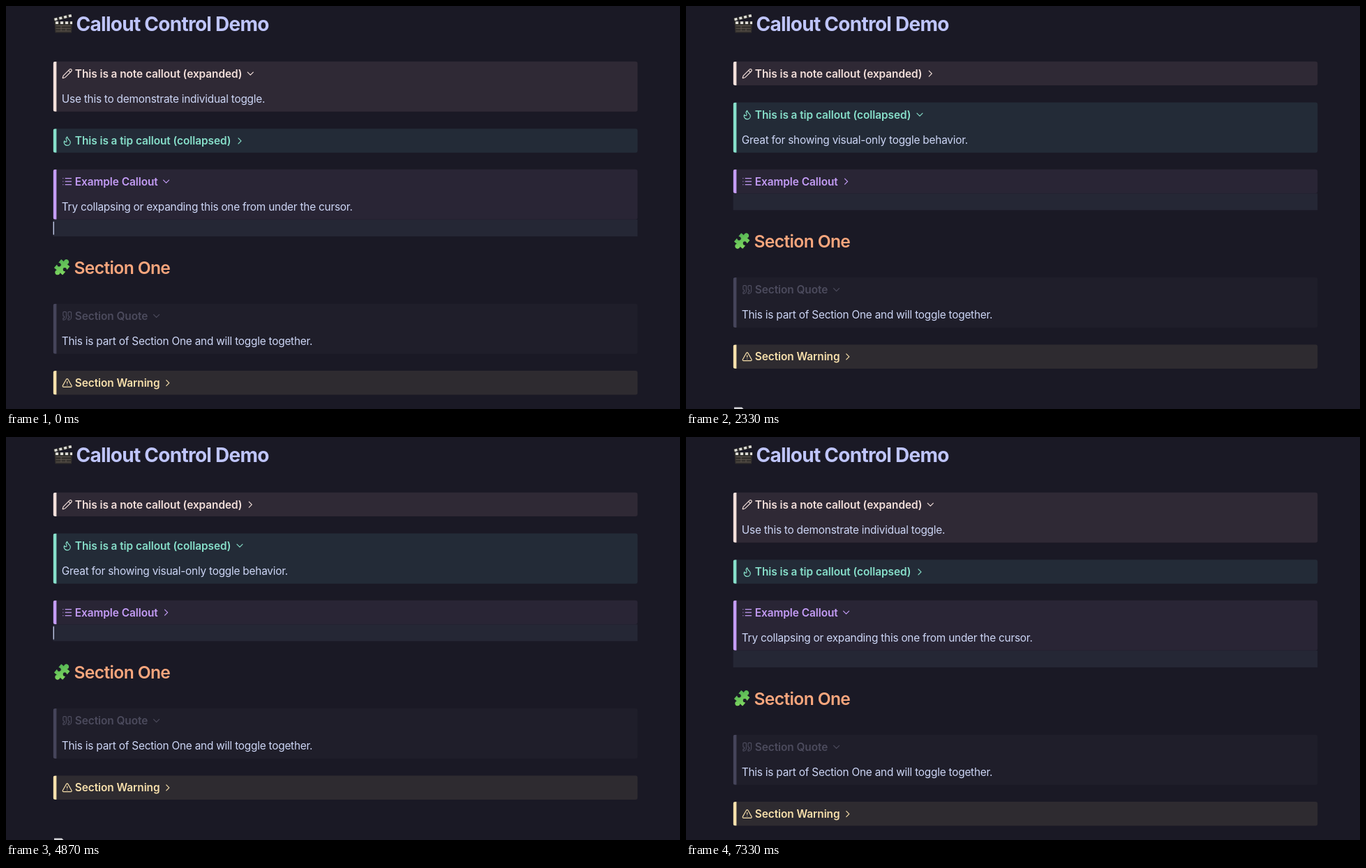
Recreate the animation shown at these times as an HTML page. Size 966 px wide and 579 px high, loop 7.4 s.

```html
<!DOCTYPE html>
<html lang="en">
<head>
<meta charset="utf-8">
<title>Callout Control Demo</title>
<style>
  /* --b: 0 = first layout, 1 = toggled layout; --turn: chevron progress between them */
  @property --b { syntax: "<number>"; inherits: true; initial-value: 0; }
  @property --turn { syntax: "<number>"; inherits: true; initial-value: 0; }

  html, body { margin: 0; width: 100%; height: 100%; overflow: hidden; background: #1a1925; }
  svg {
    display: block; width: 966px; height: 579px;
    font-family: Inter, "Liberation Sans", sans-serif;
    font-optical-sizing: none;
    --step: 37.7px;
    animation: layout 7.4s step-end infinite, turn 7.4s step-end infinite;
  }

  .h1 { font-size: 28px; font-weight: 700; letter-spacing: -.74px; fill: #bfc5fb; }
  .h2 { font-size: 24.6px; font-weight: 600; letter-spacing: -.62px; fill: #f8a67d; }
  .title { font-size: 15.4px; font-weight: 600; letter-spacing: -.06px; fill: var(--ink); }
  .text { font-size: 15.4px; letter-spacing: -.235px; fill: #cdd6f6; }
  .icon, .fold { fill: none; stroke: var(--ink); stroke-linecap: round; stroke-linejoin: round; }
  .icon { stroke-width: 1.8; }
  .fold { stroke-width: 1.2; }

  .box { width: 837.6px; height: var(--h); rx: 3px; fill: var(--bg); }
  .bar { width: 5px; height: var(--h); fill: var(--edge, var(--ink)); clip-path: inset(0 round 3px 0 0 3px); }

  .note { --ink: #f3dfda; --bg: #2f2935; }
  .tip { --ink: #87dfca; --bg: #232b37; }
  .example { --ink: #c49cf6; --bg: #292535; }
  .quote { --ink: #4c4b5d; --bg: #1f1e2a; --edge: #45445a; }
  .warning { --ink: #f8e0ac; --bg: #2e2b30; }

  .closing { --h: calc(72px - var(--b) * var(--step)); }
  .opening { --h: calc(34.5px + var(--b) * var(--step)); }
  .open { --h: 72px; }
  .shut { --h: 34.5px; }

  .closing .text { opacity: calc(1 - var(--b)); }
  .opening .text { opacity: var(--b); }
  .closing .fold { transform: rotate(calc(var(--turn) * -90deg)); }
  .opening .fold { transform: rotate(calc((var(--turn) - 1) * 90deg)); }
  .shut .fold { transform: rotate(-90deg); }

  .rise { transform: translateY(calc(var(--b) * -1 * var(--step))); }
  .caret { animation: blink 7.4s step-end infinite; }

  @keyframes layout {
    0%, 35.134%, 69.323%, 100% { --b: 0; }
    17.972%, 51.35% { --b: 1; }
  }
  @keyframes turn {
    0%, 36.08%, 70.269%, 100% { --turn: 0; }
    17.972%, 35.134%, 51.35%, 69.323% { --turn: .69; }
    18.918%, 52.296% { --turn: 1; }
  }
  @keyframes blink {
    0%, 10.81%, 24.323%, 37.837%, 51.35%, 64.864%, 78.377%, 91.891%, 100% { opacity: 1; }
    4.459%, 17.972%, 31.486%, 44.999%, 58.513%, 72.026%, 85.54%, 99.053% { opacity: 0; }
  }
</style>
</head>
<body>
<svg viewBox="0 0 966 579">
  <defs>
    <path id="chevron" d="M-4-2 0 2 4-2"/>
    <path id="mark" d="M16 3a2 2 0 0 0-2 2v6a2 2 0 0 0 2 2 1 1 0 0 1 1 1v1a2 2 0 0 1-2 2 1 1 0 0 0-1 1v2a1 1 0 0 0 1 1 6 6 0 0 0 6-6V5a2 2 0 0 0-2-2z"/>
    <linearGradient id="leaf" x1="0" y1="0" x2="1" y2="1">
      <stop offset="0" stop-color="#4fb153"/>
      <stop offset="1" stop-color="#86dc62"/>
    </linearGradient>
  </defs>

  <!-- clapper board -->
  <path d="M69.5 23.5H95L94 38.5H70.5Z" fill="#33302d"/>
  <path d="M71.5 28.5H93M71.5 32.3H93M71.5 36H93M79 28.5V36M86 32V36" stroke="#625b52" stroke-width=".9" fill="none"/>
  <g fill="none" stroke-width="4.4">
    <path d="M68.5 19.8 94 13.6M69.5 24.1H95.5" stroke="#33322f"/>
    <path d="M69.5 19.5 94 13.6M71 24.1H95" stroke="#dddcd6" stroke-width="3.6" stroke-dasharray="4 3"/>
  </g>
  <text class="h1" x="100.6" y="35.6">Callout Control Demo</text>

  <g class="note closing" transform="translate(67.6 79.8)">
    <rect class="box"/><rect class="bar"/>
    <path class="icon" transform="translate(12.3 9.5) scale(.65)" d="M21.2 6.8a1 1 0 0 0-4-4L3.8 16.2a2 2 0 0 0-.5.8L2 21.4a.5.5 0 0 0 .6.6L7 20.7a2 2 0 0 0 .8-.5zM15 5l4 4"/>
    <text class="title" x="31.2" y="23">This is a note callout (expanded)</text>
    <g transform="translate(282.7 17.4)"><use class="fold" href="#chevron"/></g>
    <text class="text" x="12.2" y="59">Use this to demonstrate individual toggle.</text>
  </g>

  <g class="rise">
    <g class="tip opening" transform="translate(67.6 176.3)">
      <rect class="box"/><rect class="bar"/>
      <path class="icon" transform="translate(12.3 9.7) scale(.65)" d="M8.5 14.5A2.5 2.5 0 0 0 11 12c0-1.4-.5-2-1-3-1.1-2.1-.2-4.1 2-6 .5 2.5 2 4.9 4 6.5s3 3.5 3 5.5a7 7 0 1 1-14 0c0-1.2.4-2.3 1-3a2.5 2.5 0 0 0 2.5 2.5z"/>
      <text class="title" x="31.2" y="23">This is a tip callout (collapsed)</text>
      <g transform="translate(267.4 17.5)"><use class="fold" href="#chevron"/></g>
      <text class="text" x="12.2" y="59">Great for showing visual-only toggle behavior.</text>
    </g>
  </g>

  <g class="example closing" transform="translate(67.6 234.7)">
    <rect class="box"/><rect class="bar"/>
    <path class="icon" transform="translate(12.3 9.6) scale(.65)" d="M3 5h.01M3 12h.01M3 19h.01M8 5h13M8 12h13M8 19h13"/>
    <text class="title" x="31.2" y="23.1">Example Callout</text>
    <g transform="translate(162 17.5)"><use class="fold" href="#chevron"/></g>
    <text class="text" x="12.2" y="59.1">Try collapsing or expanding this one from under the cursor.</text>
  </g>

  <g class="rise">
    <rect x="67.6" y="307" width="837.6" height="24" fill="#252735"/>
    <rect class="caret" x="67.6" y="309.8" width="1.3" height="18.8" fill="#cdd6f6"/>

    <!-- puzzle piece -->
    <path transform="translate(80.2 375.2) rotate(40)" fill="url(#leaf)" stroke="url(#leaf)" stroke-linejoin="round"
      d="M-7.5-7.5H-2A3.1 3.1 0 1 1 2-7.5H7.5V-2.4A3.2 3.2 0 1 0 7.5 2.4V7.5H2A3.1 3.1 0 1 1-2 7.5H-7.5V2.4A3.2 3.2 0 1 0-7.5-2.4Z"/>
    <text class="h2" x="97.4" y="385">Section One</text>

    <g class="quote open" transform="translate(67.6 427.8)">
      <rect class="box"/><rect class="bar"/>
      <g class="icon" transform="translate(12.3 9.6) scale(.65)">
        <use href="#mark"/><use href="#mark" x="-11"/>
      </g>
      <text class="title" x="31.2" y="23">Section Quote</text>
      <g transform="translate(148 17.5)"><use class="fold" href="#chevron"/></g>
      <text class="text" x="12.2" y="59">This is part of Section One and will toggle together.</text>
    </g>

    <g class="warning shut" transform="translate(67.6 524.1)">
      <rect class="box"/><rect class="bar"/>
      <path class="icon" transform="translate(12.3 9.6) scale(.65)" d="m21.7 18-8-14a2 2 0 0 0-3.5 0l-8 14A2 2 0 0 0 4 21h16a2 2 0 0 0 1.7-3M12 9v4M12 17h.01"/>
      <text class="title" x="31.2" y="23">Section Warning</text>
      <g transform="translate(164.2 17.5)"><use class="fold" href="#chevron"/></g>
    </g>

    <!-- top of the next heading's page icon -->
    <path d="M69 614.3H80L86 620V636H69Z" fill="#d3d3d8"/>
  </g>
</svg>
</body>
</html>
```
